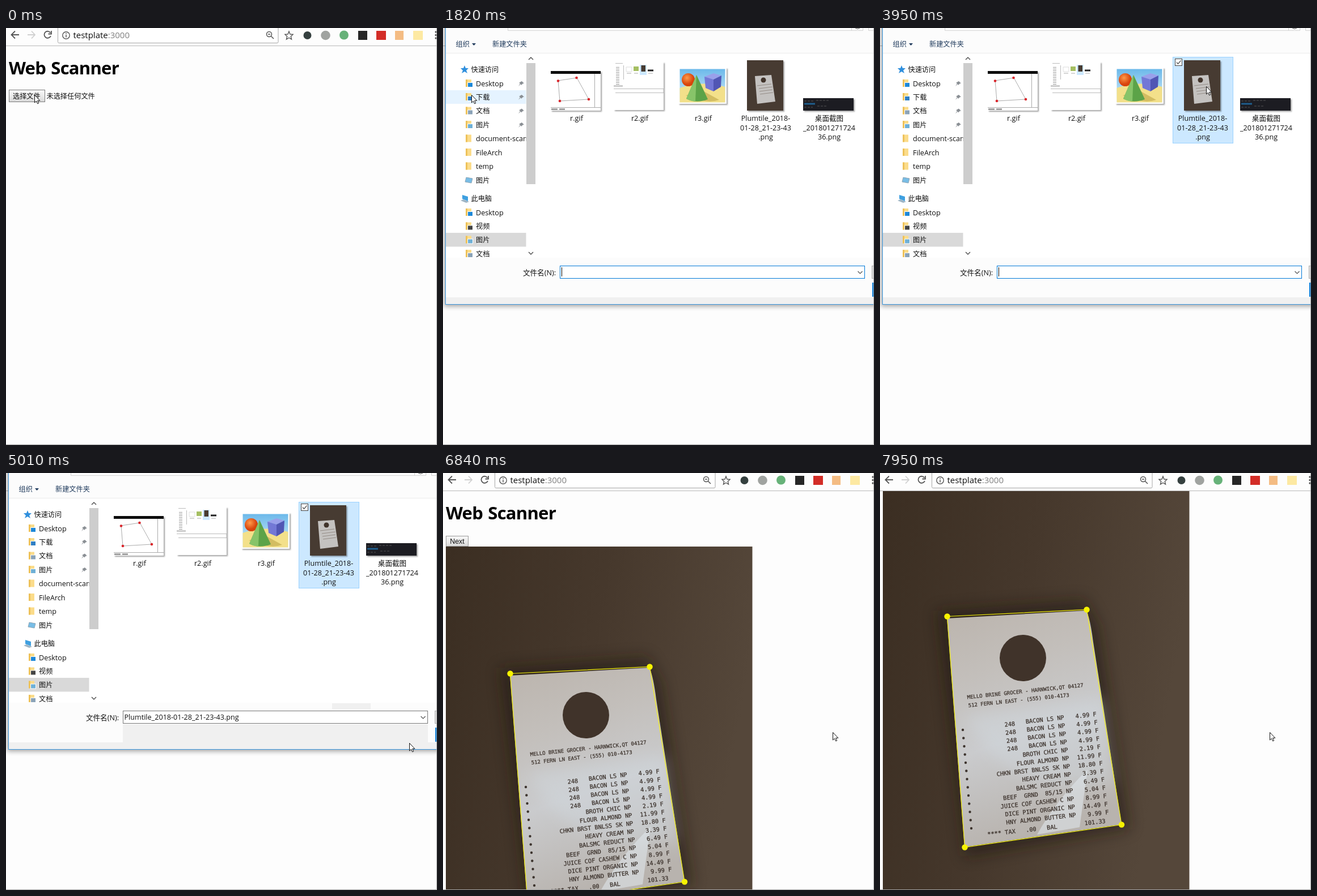
Write an HTML page that moves like this. It is 760x737 px and loops after 8000 ms.

```html
<!DOCTYPE html>
<html lang="zh-CN">
<head>
<meta charset="utf-8">
<title>Web Scanner</title>
<style>
  html, body { margin: 0; width: 100%; height: 100%; overflow: hidden; background: #fdfdfd; }
  svg { display: block; width: 760px; height: 737px; }
  text { font: 12.6px "Open Sans", "Noto Sans CJK SC", "Noto Sans CJK", sans-serif; fill: #111; white-space: pre; }
  .cjk { font-size: 12.2px; }
  .mid { text-anchor: middle; }
  .end { text-anchor: end; }
  .line { fill: none; stroke: #555; }
  .title { font-size: 31px; font-weight: bold; letter-spacing: -.75px; word-spacing: 2px; fill: #000; }
  #rows text, #head text { font-family: "DejaVu Sans Mono", monospace; fill: #3a302a; stroke: #3a302a; stroke-width: .25; }
  #rows text { font-size: 10.3px; }
  #head text { font-size: 9px; }
  [data-at] { opacity: 0; }
</style>
</head>
<body>
<svg viewBox="0 0 760 737">
  <defs>
    <linearGradient id="btn" x2="0" y2="1"><stop stop-color="#f8f8f8"/><stop offset=".45" stop-color="#ececec"/><stop offset="1" stop-color="#d8d8d8"/></linearGradient>
    <linearGradient id="down" x2="0" y2="1"><stop stop-color="#d6d6d6"/><stop offset="1" stop-color="#f2f2f2"/></linearGradient>
    <linearGradient id="desk" x2="1" y2=".25"><stop stop-color="#3b2e22"/><stop offset=".5" stop-color="#46382c"/><stop offset="1" stop-color="#55473a"/></linearGradient>
    <linearGradient id="paper" x2=".25" y2="1"><stop stop-color="#bbb4ad"/><stop offset=".3" stop-color="#c3bfbb"/><stop offset=".6" stop-color="#cacbcd"/><stop offset="1" stop-color="#b8b3ae"/></linearGradient>
    <linearGradient id="sky" x2="0" y2="1"><stop stop-color="#6cb9ea"/><stop offset="1" stop-color="#d8eefa"/></linearGradient>
    <radialGradient id="ball" cx=".4" cy=".35"><stop stop-color="#ff9a4a"/><stop offset="1" stop-color="#d8440c"/></radialGradient>
    <filter id="soft" x="-30%" y="-30%" width="160%" height="160%"><feGaussianBlur stdDeviation="13"/></filter>
    <filter id="shade"><feGaussianBlur stdDeviation="4"/></filter>
    <filter id="drop"><feDropShadow dx="2" dy="2" stdDeviation="1" flood-opacity=".35"/></filter>
    <clipPath id="view"><path d="M0 32H759V736H0Z"/></clipPath>
    <clipPath id="shot"><path d="M5 130H545.5V870H5Z"/></clipPath>
    <clipPath id="nav"><path d="M5 45H146.5V405H5Z"/></clipPath>
    <g id="folder"><path d="M0-7H10V6H0Z" fill="#fbdc8a"/><path d="M0-7H3V6H0Z" fill="#edc25a"/></g>
    <path id="pin" d="M1-4L5 0 3 0 0 3-1 1-5 5-2 0-4-1-1-3Z" fill="#8a8f94"/>
  </defs>

  <rect width="760" height="737" fill="#fdfdfd"/>

  <g clip-path="url(#view)">
    <g id="page">
      <text class="title" x="5" y="82">Web Scanner</text>
      <g data-at="0:1 6840:0">
        <rect x="5.5" y="109.5" width="63" height="21" fill="url(#btn)" stroke="#7d7d7d"/>
        <rect x="5.5" y="109.5" width="63" height="21" fill="url(#down)" stroke="#a0a0a0" data-at="0:0 1550:1 1700:0"/>
        <text class="cjk" x="12" y="125">选择文件</text>
        <text class="cjk" x="71.5" y="125">未选择任何文件</text>
      </g>
      <g data-at="0:0 6840:1">
        <rect x="5.5" y="111.5" width="39" height="18" fill="url(#btn)" stroke="#9a9a9a"/>
        <text class="mid" x="25" y="124.5" style="font:12.5px 'Liberation Sans',sans-serif">Next</text>
        <g clip-path="url(#shot)">
          <rect x="5" y="130" width="541" height="740" fill="url(#desk)"/>
          <path d="M100 345L360 325 385 370 440 730 150 780Z" fill="#1b120b" opacity=".5" filter="url(#soft)"/>
          <path d="M118 358L364 344Q371 360 376 400L426 722 149 762Z" fill="url(#paper)"/>
          <path d="M150 530L390 500 410 650 330 655Q200 640 150 530Z" fill="#d3dbe2" opacity=".4" filter="url(#soft)"/>
          <path d="M366 625L352 727 277 740Q310 680 366 625Z" fill="#dfe6ec" opacity=".6"/>
          <circle cx="252" cy="428" r="41" fill="#40332a"/>
          <g id="head">
            <text transform="translate(154 500.5) rotate(-6)">MELLO BRINE GROCER - HARNWICK,QT 04127</text>
            <text transform="translate(156 515) rotate(-6)">512 FERN LN EAST - (555) 010-4173</text>
          </g>
          <g id="rows"></g>
          <path d="M118.5 354.5L364.5 342.5 426 722.5 149.5 762.5Z" fill="none" stroke="#f2ee10" stroke-width="1.2"/>
          <g fill="#f7f300"><circle cx="118.5" cy="354.5" r="5.2"/><circle cx="364.5" cy="342.5" r="5.2"/><circle cx="426" cy="722.5" r="5.2"/><circle cx="149.5" cy="762.5" r="5.2"/></g>
        </g>
      </g>
    </g>
  </g>

  <g id="browser">
    <path d="M0 31.5H759" stroke="#b8b8b8"/>
    <path d="M91.5 0V24.5Q91.5 26.5 93.5 26.5H478Q480 26.5 480 24.5V0" fill="#fff" stroke="#a6a6a6"/>
    <g class="line" stroke-width="1.8">
      <path d="M23 12H10M16 5.5L9.5 12 16 18.5"/>
      <path d="M38 12H51M45 5.5L51 12 45 18.5" stroke="#d0d0d0"/>
      <path d="M78.5 8.5A6 6 0 1 0 79 14M80 5V10.5H74.5"/>
      <circle cx="106" cy="13" r="6.2" stroke-width="1.4"/>
      <path d="M106 12V16.5M106 9V10.8" stroke-width="1.5"/>
      <circle cx="464" cy="11" r="4.5" stroke-width="1.5"/>
      <path d="M467.5 14.5L472 19M462 11H466" stroke-width="1.5"/>
      <path d="M499 6L501 11 506 11.4 502.3 14.7 503.5 20 499 17.2 494.5 20 495.7 14.7 492 11.4 497 11Z" stroke-width="1.4"/>
    </g>
    <text x="118.5" y="18" style="font-size:15px">testplate<tspan fill="#808080">:3000</tspan></text>
    <circle cx="531.5" cy="13" r="7" fill="#35403f"/>
    <circle cx="563.5" cy="13" r="8.3" fill="#a0a3a0"/>
    <circle cx="596" cy="12.5" r="8" fill="#67b279"/>
    <rect x="621" y="5" width="16" height="16" fill="#262626"/>
    <rect x="653" y="5" width="17" height="16" fill="#d32d27"/>
    <rect x="686" y="5" width="15" height="16" fill="#f4bc83"/>
    <rect x="718" y="5" width="17" height="16" fill="#fde9a2"/>
    <g fill="#555"><circle cx="758" cy="7" r="1.7"/><circle cx="758" cy="12.5" r="1.7"/><circle cx="758" cy="18" r="1.7"/></g>
  </g>

  <g data-at="0:0 520:.5 650:1 1550:.55 1700:0">
    <rect x="51" y="138" width="95" height="20" fill="#000" opacity=".3"/>
    <rect x="48.5" y="135.5" width="95" height="20" fill="#fff" stroke="#767676"/>
    <text class="cjk" x="53" y="150" style="fill:#575757">未选择任何文件</text>
  </g>

  <g id="dialog" data-at="0:0 1700:.5 1820:1 5860:0">
    <rect x="2" y="-20" width="790" height="512" fill="#000" opacity=".35" filter="url(#shade)"/>
    <rect x="4.5" y="-5" width="770" height="493.5" fill="#fcfcfc" stroke="#3a96dd"/>
    <path d="M5 45H760V406H5Z" fill="#fff"/>
    <path d="M5 476H760V488H5Z" fill="#f0f0f0"/>
    <path d="M5 44.5H760" stroke="#ececec"/>
    <path d="M114.5 0V4.5H740.5V0M720.5 0V4M750.5 0V4.5H760" class="line" style="stroke:#d5d5d5"/>
    <path d="M727 0Q731 3 735 0" class="line"/>
    <text class="cjk" x="22.5" y="33" style="fill:#1e395b">组织</text>
    <path d="M51 27H58L54.5 31Z" fill="#1e395b"/>
    <text class="cjk" x="87" y="33" style="fill:#1e395b">新建文件夹</text>
    <g fill="#e5f3ff">
      <path d="M5 110H146.5V134H5Z" data-at="0:0 1820:1 2490:0"/>
      <path d="M5 134H146.5V158H5Z" data-at="0:0 2490:1 2760:0"/>
    </g>
    <path d="M5 362H146.5V386.5H5Z" fill="#d9d9d9"/>
    <g id="tree" clip-path="url(#nav)"></g>
    <g class="line" stroke-width="1.5" data-at="0:0 1970:1 2880:.85 3020:.7 3140:.55 3260:.4 3410:.3 3530:.2 3680:.1 3800:0">
      <path d="M12.5 71.5L16.5 75.5 20.5 71.5M12.5 299.5L16.5 303.5 20.5 299.5" stroke="#333"/>
      <path d="M23 322L27 326 23 330M23 346.5L27 350.5 23 354.5M23 371L27 375 23 379M23 395L27 399 23 403" stroke="#999"/>
    </g>
    <path d="M147 62H163V276H147Z" fill="#cdcdcd"/>
    <path d="M151 56L155 52 159 56M151 396L155 400 159 396" class="line" stroke-width="1.5"/>

    <rect x="516.5" y="51.5" width="106" height="152" fill="#e5f3ff" data-at="0:0 3410:1 3950:0"/>
    <g data-at="0:0 3950:1">
      <rect x="516.5" y="51.5" width="106" height="152" fill="#cce8ff" stroke="#99d1ff"/>
      <rect x="520.5" y="54.5" width="12" height="12" fill="#fff" stroke="#444"/>
      <path d="M523 60.5L525.5 63.5 530.5 57.5" class="line" stroke-width="1.3"/>
    </g>

    <g filter="url(#drop)">
      <path d="M190 76H278V146H190Z" fill="#fff"/>
      <path d="M301 60H389V145H301Z" fill="#fff"/>
      <path d="M415 70H500V134H415Z" fill="#fff"/>
      <path d="M536 57H600V146H536Z" fill="#473b31"/>
      <path d="M635 124H724V146H635Z" fill="#1e1f22"/>
    </g>
    <path d="M190 76H278V81H190Z" fill="#0b0b0b"/>
    <path d="M203 93L236 88 257 126 206 129ZM267.5 81V140.5M190 140.5H278" class="line" style="stroke:#aaa"/>
    <path d="M191 143.5H202M205 143.5H215" stroke="#777" stroke-width="2"/>
    <g fill="#d9252b"><circle cx="203" cy="93.5" r="2.3"/><circle cx="235.5" cy="88" r="2.3"/><circle cx="257" cy="126" r="2.3"/><circle cx="206" cy="129" r="2.3"/></g>
    <path d="M304 62.5H317M318.5 66V91M301 107.5H389V114.5H304" class="line" style="stroke:#bbb"/>
    <path d="M308 69V100" stroke="#999" stroke-width="6" stroke-dasharray="1 2"/>
    <path d="M301 101H317V104H301Z" fill="#ccc"/>
    <path d="M323 69H333V77H323Z" fill="none" stroke="#ddd"/>
    <path d="M336 68H345V76H336Z" fill="#a5bf62"/>
    <path d="M347 65H359V83H347Z" fill="#cce8ff"/>
    <path d="M349.5 66H357V77H349.5Z" fill="#473b31"/>
    <path d="M361 73.5H371V76.5H361Z" fill="#222"/>
    <path d="M324 80H332M337 80H344M362 80H370" stroke="#aaa"/>
    <path d="M417.5 72.5H497.5V131.5H417.5Z" fill="url(#sky)"/>
    <path d="M417.5 106Q455 92 497.5 104V131.5H417.5Z" fill="#f3e08a"/>
    <path d="M428 119Q465 135 487 127L460 112Z" fill="#d3bd62"/>
    <circle cx="432.5" cy="91.5" r="11.5" fill="url(#ball)"/>
    <path d="M447 83L467 126Q447 134 429 125Z" fill="#5ca348"/>
    <path d="M447 83L445 130Q435 129 429 125Z" fill="#87c469"/>
    <path d="M461 86L477 80 491 84 477 91Z" fill="#9aa0ea"/>
    <path d="M461 86L477 91V112L463 106Z" fill="#7378d6"/>
    <path d="M477 91L491 84 490 104 477 112Z" fill="#5156b4"/>
    <path d="M550 85L579 83 586 130 554 134Z" fill="#c4c2c0"/>
    <circle cx="565" cy="92" r="4.5" fill="#40332a"/>
    <path d="M554 102L579 99M557 107L581 104M558 112L581 109M559 117L582 114" stroke="#948c86"/>
    <path d="M637 134H656" stroke="#1f5d8c" stroke-width="3"/>
    <path d="M637 129H655M658 128H682M637 140H652M660 138H678" stroke="#555" stroke-dasharray="4 2"/>
    <g class="mid">
      <text x="235.5" y="164">r.gif</text><text x="347" y="164">r2.gif</text><text x="459" y="164">r3.gif</text>
      <text x="569" y="164">Plumtile_2018-</text><text x="569" y="180.5">01-28_21-23-43</text><text x="569" y="197">.png</text>
      <text x="681" y="164">桌面截图</text><text x="681" y="180.5">_201801271724</text><text x="681" y="197">36.png</text>
    </g>

    <path d="M206 444H744V476H206Z" fill="#f0f0f0" data-at="0:0 4230:1"/>
    <path d="M575 407H643V418.5H575Z" fill="#f0f0f0" data-at="0:0 4860:1"/>
    <text class="end" x="199" y="436.5">文件名(N):</text>
    <rect x="206.5" y="420.5" width="537" height="22" fill="#fff" stroke="#777"/>
    <rect x="206.5" y="420.5" width="537" height="22" fill="none" stroke="#0078d7" data-at="0:1 4230:0"/>
    <path d="M209.5 423V439" stroke="#000" data-at="0:0 1820:1 2340:0 2880:1 3410:0 3950:1 4080:0"/>
    <text x="208.5" y="436" data-at="0:0 4230:1">Plumtile_2018-01-28_21-23-43.png</text>
    <path d="M731.5 430L735.5 434 739.5 430" class="line" stroke-width="1.2"/>
    <rect x="756.5" y="420.5" width="20" height="22" fill="#e1e1e1" stroke="#adadad"/>
    <rect x="758" y="451" width="20" height="23" fill="#e1e1e1" stroke="#0078d7" stroke-width="2"/>
    <rect x="758" y="451" width="20" height="23" fill="#cce4f7" stroke="#005499" stroke-width="2" data-at="0:0 5590:1"/>
  </g>

  <path d="M759.5 0V736.5H0" fill="none" stroke="#a5a5a5"/>
  <path id="cursor" d="M.5.5V14L3.5 11.2 5.6 15.8 7.7 14.9 5.7 10.3H9.8Z" fill="#fff" stroke="#111"/>
</svg>
<script>
const LOOP = 8000;
const $ = id => document.getElementById(id);

// Folder tree: y, x, label, badge colour, pinned
const tree = [
  [98, 58, 'Desktop', '#1e88d8', 1], [122, 58, '下载', '#2f7fc4', 1], [146.5, 58, '文档', '#8ba3b8', 1],
  [171, 58, '图片', '#6fb0d6', 1], [195.5, 58, 'document-scans'], [220, 58, 'FileArch'], [244.5, 58, 'temp'],
  [326, 58, 'Desktop', '#1e88d8'], [350.5, 58, '视频', '#444'], [374.5, 58, '图片', '#6fb0d6'], [399, 58, '文档', '#8ba3b8']
];
const label = (x, y, s) => `<text x="${x}" y="${y + 4.5}"${/^[a-z]/i.test(s) ? '' : ' class="cjk"'}>${s}</text>`;
$('tree').innerHTML = tree.map(([y, x, name, badge, pinned]) =>
  `<use href="#folder" x="40" y="${y}"/>` +
  (badge ? `<rect x="43.5" y="${y - 1.5}" width="9" height="8" fill="${badge}" stroke="#fff"/>` : '') +
  (pinned ? `<use href="#pin" x="138" y="${y}"/>` : '') + label(x, y, name)).join('') +
  '<path d="M38 66L40 71 45 71 41 75 43 80 38 77 33 80 35 75 31 71 36 71Z" fill="#2f8fdd"/>' + label(49.5, 73, '快速访问') +
  '<path d="M34 295L44 298V306L34 302Z" fill="#3fa0e0"/><path d="M31 305L36 303 46 307 41 309Z" fill="#9db4c4"/>' + label(49.5, 301, '此电脑') +
  '<path d="M41 264L52 266 50 274 39 272Z" fill="#78bde6" stroke="#8fa6b5"/>' + label(58, 269, '图片');

// Receipt lines
const goods = [
  ['BACON LS', '4.99 F'], ['BACON LS', '4.99 F'], ['BACON LS', '4.99 F'], ['BACON LS', '4.99 F'],
  ['BROTH CHIC', '2.19 F'], ['FLOUR ALMOND', '11.99 F'], ['CHKN BRST BNLSS SK', '18.80 F'],
  ['HEAVY CREAM', '3.39 F'], ['BALSMC REDUCT', '6.49 F'], ['BEEF  GRND  85/15', '5.04 F'],
  ['JUICE COF CASHEW C', '8.99 F'], ['DICE PINT ORGANIC', '14.49 F'], ['HNY ALMOND BUTTER', '9.99 F']
];
const print = (x, y, s) => `<text class="end" transform="translate(${x} ${y + 3.5}) rotate(-6.3)">${s}</text>`;
$('rows').innerHTML = goods.map(([name, price], i) =>
  print(325 + 1.75 * i, 533 + 14.35 * i, name + ' NP') +
  print(382 + 1.8 * i, 527 + 14.45 * i, price) +
  (i < 4 ? print(238.5 + 1.6 * i, 544 + 14.35 * i, '248') : '') +
  `<circle cx="${146 + 1.25 * i}" cy="${555 + 14.5 * i}" r="2.2" fill="#3d342e"/>`).join('') +
  print(313, 726, '**** TAX   .00   BAL') + print(398, 716, '101.33');

// Each step: time, x, y
const path = [
  [0, 50, 118], [2490, 51, 133], [2610, 52, 146], [2760, 407, 205], [3020, 412, 198], [3140, 424, 188],
  [3260, 443, 172], [3410, 520, 135], [3530, 560, 115], [3680, 573, 106], [3800, 575, 103],
  [4350, 575, 108], [4470, 576, 130], [4590, 580, 195], [4710, 590, 298], [4860, 625, 451],
  [5010, 711, 477], [5140, 712, 477], [5290, -50, 0], [5440, 621, 362], [5720, -50, 0],
  [6570, 710, 461], [6710, 687, 458]
];
const scroll = [[0, 0], [7830, -50], [7950, -101]];
const fades = [...document.querySelectorAll('[data-at]')].map(el =>
  [el, el.dataset.at.split(' ').map(s => s.split(':').map(Number))]);

const at = (steps, t) => steps.reduce((hit, s) => s[0] <= t ? s : hit);

function draw() {
  const t = performance.now() % LOOP;
  for (const [el, steps] of fades) el.style.opacity = at(steps, t)[1];
  const [, x, y] = at(path, t);
  $('cursor').setAttribute('transform', `translate(${x} ${y})`);
  $('page').setAttribute('transform', `translate(0 ${at(scroll, t)[1]})`);
  requestAnimationFrame(draw);
}
draw();
</script>
</body>
</html>
```
